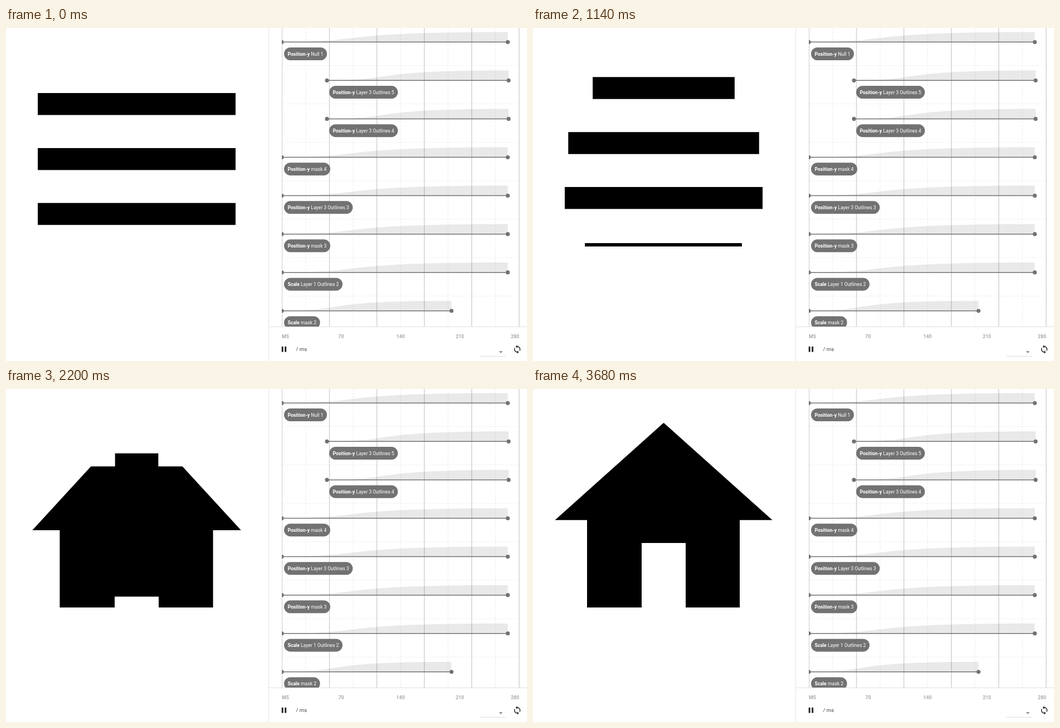
An HTML page with a canvas that plays this animation: 935x599 px, repeating every 5.68 s.

```html
<!DOCTYPE html>
<html lang="en">
<head>
<meta charset="utf-8">
<title>Menu to home</title>
<style>
  html, body { margin: 0; width: 100%; height: 100%; overflow: hidden; background: #fff; }
  canvas { display: block; width: 935px; height: 599px; }
</style>
</head>
<body>
<canvas id="stage" width="935" height="599"></canvas>
<script>
const ctx = document.getElementById('stage').getContext('2d');
const LOOP = 5680;
const FONT = 'Roboto, "Open Sans", sans-serif';
const CX = 234.5;

// Monotone cubic track through [time, value] pairs
function track(...keys) {
  const n = keys.length;
  const slope = i => (keys[i + 1][1] - keys[i][1]) / (keys[i + 1][0] - keys[i][0]);
  const tangent = keys.map((_, i) => {
    if (i === 0 || i === n - 1) return 0;
    const a = slope(i - 1), b = slope(i);
    return a * b > 0 ? 2 * a * b / (a + b) : 0;
  });
  return t => {
    if (t <= keys[0][0]) return keys[0][1];
    if (t >= keys[n - 1][0]) return keys[n - 1][1];
    let i = 0;
    while (t > keys[i + 1][0]) i++;
    const [t0, v0] = keys[i], [t1, v1] = keys[i + 1];
    const d = t1 - t0, u = (t - t0) / d, w = 1 - u;
    return v0 * (1 + 2 * u) * w * w + tangent[i] * d * u * w * w
         + v1 * u * u * (3 - 2 * u) - tangent[i + 1] * d * u * u * w;
  };
}

// cubic-bezier(.4, 0, .2, 1)
function ease(x) {
  if (x <= 0) return 0;
  if (x >= 1) return 1;
  let lo = 0, hi = 1;
  for (let i = 0; i < 24; i++) {
    const s = (lo + hi) / 2, r = 1 - s;
    if (1.2 * r * r * s + 0.6 * r * s * s + s * s * s < x) lo = s; else hi = s;
  }
  return lo * lo * (3 - 2 * lo);
}

const lift = track([500, 0], [780, 8.5], [1140, 28.7], [1440, 52.2], [1840, 87],
                   [2280, 102.5], [2720, 113], [3200, 117.2], [3680, 118.5]);
const topHalf = track([500, 177.5], [780, 168], [1140, 127.5], [1440, 74.5], [1840, 32.5], [2280, 12]);
const midHalf = track([960, 177.5], [1140, 171.3], [1440, 143.5], [1840, 74.5], [2280, 34], [2720, 18]);
const wallRise = track([960, 0], [1140, 6], [1440, 35], [1840, 113], [2200, 150], [2720, 171], [3200, 175]);

function bar(half, y) {
  const top = Math.max(y, 58), bottom = y + 39.5;
  if (bottom > top) ctx.fillRect(CX - half, top, half * 2, bottom - top);
}

function drawIcon(t) {
  const up = lift(t);
  ctx.fillStyle = '#000';
  bar(topHalf(t), 117 - up);
  bar(midHalf(t), 216 - up);

  const roof = ease((t - 1320) / 2360);
  const eaves = 354.2 - up, ridge = eaves - 39.5 - 135.5 * roof;
  const wide = 177.5 + 17.5 * roof, narrow = 177.5 * Math.pow(1 - roof, 0.95);
  ctx.beginPath();
  ctx.moveTo(CX - narrow, ridge);
  ctx.lineTo(CX + narrow, ridge);
  ctx.lineTo(CX + wide, eaves);
  ctx.lineTo(CX - wide, eaves);
  ctx.fill();

  const rise = wallRise(t), half = 141 - 4 * rise / 175;
  ctx.fillRect(234 - half, 393 - rise, half * 2, rise);

  const door = 116 * ease((t - 1840) / 1650);
  ctx.fillStyle = '#fff';
  if (door > 0) ctx.fillRect(195, 393 - door, 79, door + 1);
}

function line(x0, y0, x1, y1, color, width = 1, dash = []) {
  ctx.strokeStyle = color;
  ctx.lineWidth = width;
  ctx.setLineDash(dash);
  ctx.beginPath();
  ctx.moveTo(x0, y0);
  ctx.lineTo(x1, y1);
  ctx.stroke();
  ctx.setLineDash([]);
}

function text(str, x, y, size, color, weight = 400, align = 'left') {
  ctx.font = `${weight} ${size}px ${FONT}`;
  ctx.fillStyle = color;
  ctx.textAlign = align;
  ctx.fillText(str, x, y);
  return ctx.measureText(str).width;
}

function dot(x, y) {
  ctx.beginPath();
  ctx.arc(x, y, 3.6, 0, 7);
  ctx.fill();
}

const ROWS = [
  ['Position-y', 'Null 1', 495, 900.5],
  ['Position-y', 'Layer 3 Outlines 5', 576, 902],
  ['Position-y', 'Layer 3 Outlines 4', 576, 902],
  ['Position-y', 'mask 4', 495, 900.5],
  ['Position-y', 'Layer 3 Outlines 3', 495, 900.5],
  ['Position-y', 'mask 3', 495, 900.5],
  ['Scale', 'Layer 1 Outlines 2', 495, 900.5],
  ['Scale', 'mask 2', 495, 799.5]
];
const GRAY = '#727272';
const SIZE = 8.65;

function drawRow([prop, layer, x0, x1], y) {
  const w = x1 - x0;
  ctx.fillStyle = 'rgba(0,0,0,.085)';
  ctx.beginPath();
  ctx.moveTo(x0, y);
  ctx.bezierCurveTo(x0 + 0.4 * w, y, x0 + 0.2 * w, y - 18, x1, y - 18);
  ctx.lineTo(x1, y);
  ctx.fill();

  line(x0, y, x1, y, GRAY, 1.5);
  ctx.fillStyle = GRAY;
  dot(x0, y);
  dot(x1, y);

  ctx.font = `700 ${SIZE}px ${FONT}`;
  const propW = ctx.measureText(prop + ' ').width;
  ctx.font = `400 ${SIZE}px ${FONT}`;
  const width = propW + ctx.measureText(layer).width + 13;
  const left = x0 + 4;
  ctx.beginPath();
  ctx.roundRect(left, y + 9.7, width, 23, 11.5);
  ctx.fill();
  text(prop, left + 6.4, y + 24.2, SIZE, '#fff', 700);
  text(layer, left + 6.4 + propW, y + 24.2, SIZE, '#fff');
}

function drawTimeline() {
  ctx.save();
  ctx.beginPath();
  ctx.rect(495, 0, 440, 537);
  ctx.clip();
  for (let i = 0; i < 7; i++) line(495, 67.5 + 69.1 * i, 921, 67.5 + 69.1 * i, '#ededed', 1, [3, 2]);
  for (let i = 0; i < 11; i++) {
    const x = 495.4 + 42.55 * i;
    if (i % 2) line(x, 0, x, 537, '#ebebeb', 1, [4, 2]);
    else line(x, 0, x, 537, '#cfcfcf', 1.4);
  }
  ROWS.forEach((row, i) => drawRow(row, 25.3 + 69.07 * i));
  ctx.restore();
}

const SYNC = new Path2D('M12 4V1L8 5l4 4V6c3.31 0 6 2.69 6 6 0 1.01-.25 1.97-.7 2.8l1.46 1.46C19.54 15.03 20 13.57 20 12c0-4.42-3.58-8-8-8z' +
  'm0 14c-3.31 0-6-2.69-6-6 0-1.01.25-1.97.7-2.8L5.24 7.74C4.46 8.97 4 10.43 4 12c0 4.42 3.58 8 8 8v3l4-4-4-4v3z');

function drawFooter() {
  line(471.5, 0, 471.5, 599, '#e4e4e4');
  line(472, 537.5, 935, 537.5, '#e0e0e0');
  text('MS', 495, 557.6, 8.7, '#ababab', 700);
  [70, 140, 210].forEach((n, i) => text(n, 601.5 + 106.5 * i, 557.6, 8.7, '#ababab', 700, 'center'));
  text('280', 921, 557.6, 8.7, '#ababab', 700, 'right');

  ctx.fillStyle = '#222';
  ctx.fillRect(494.7, 573, 2.9, 9.7);
  ctx.fillRect(500.2, 573, 2.9, 9.7);
  text('/ ms', 520.5, 581, 9.6, '#444');

  line(849.5, 590.5, 896, 590.5, '#dcdcdc');
  ctx.fillStyle = '#8f8f8f';
  ctx.beginPath();
  ctx.moveTo(884.5, 581.3);
  ctx.lineTo(891.5, 581.3);
  ctx.lineTo(888, 584.9);
  ctx.fill();

  ctx.save();
  ctx.translate(909, 569.5);
  ctx.scale(0.71, 0.71);
  ctx.fillStyle = '#222';
  ctx.fill(SYNC);
  ctx.restore();
}

function draw() {
  ctx.fillStyle = '#fff';
  ctx.fillRect(0, 0, 935, 599);
  drawIcon(performance.now() % LOOP);
  drawTimeline();
  drawFooter();
  requestAnimationFrame(draw);
}
draw();
</script>
</body>
</html>
```
